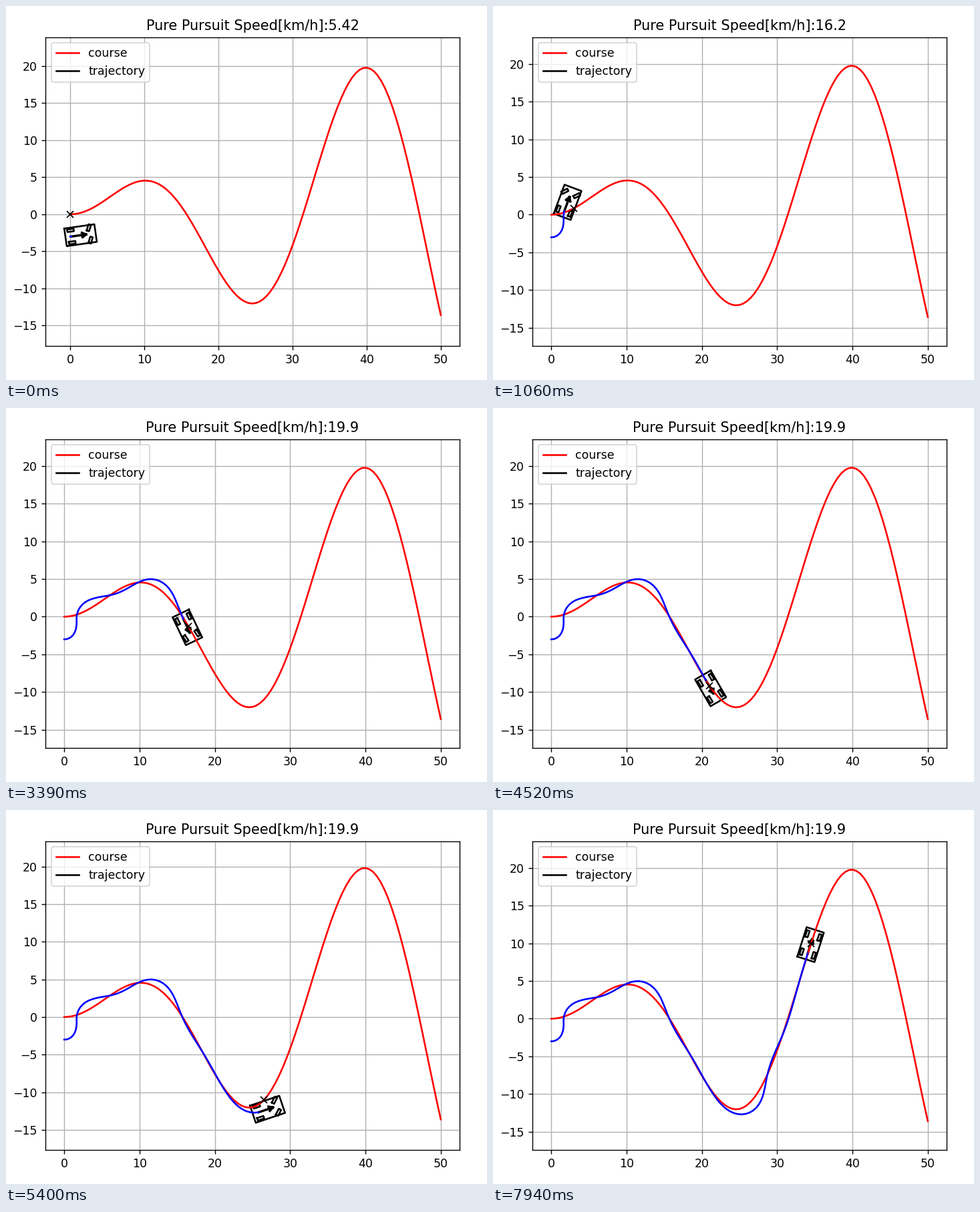
A matplotlib script that plays this animation: 720x560 px, repeating every 8 s.

```python
import math

import matplotlib.pyplot as plt
import numpy as np
from matplotlib.animation import FuncAnimation
from matplotlib.lines import Line2D

WIDTH, HEIGHT, DPI = 720, 560, 125
LOOP_MS, FRAME_MS = 8000, 40

# controller
DT, WHEELBASE, TARGET_SPEED = 0.1, 2.5, 20 / 3.6
LOOK_GAIN, LOOK_MIN = 0.1, 2.0

# drawn car, measured from the rear axle
REAR, FRONT, BODY_W = 0.8, 3.3, 2.4
TRACK, TYRE_R, TYRE_W = 1.68, 0.44, 0.35

# (first change, last change, number of changes, simulation step reached)
PLAYBACK = [
    (130, 930, 11, 15), (1060, 1260, 3, 19), (1410, 1740, 4, 27),
    (1940, 2270, 4, 34), (2530, 2530, 1, 39), (2730, 2800, 2, 44),
    (2940, 3660, 9, 54), (3790, 4520, 9, 68), (4720, 5260, 7, 80),
    (5400, 5600, 3, 84), (5750, 6530, 9, 99), (6810, 7270, 6, 111),
    (7470, 7600, 3, 117), (7870, 7940, 2, 123),
]

course_x = np.arange(0, 50.5, 0.5)
course_y = np.sin(course_x / 5) * course_x / 2


def simulate(steps):
    """Pure pursuit run; rows of x, y, yaw, v, steer, target index."""
    x, y, yaw, v = 0.0, -3.0, 0.0, 0.0
    target = nearest = 0
    rows = [(x, y, yaw, v, 0.0, 0)]
    for _ in range(steps):
        rx = x - WHEELBASE / 2 * math.cos(yaw)
        ry = y - WHEELBASE / 2 * math.sin(yaw)
        dist = np.hypot(course_x - rx, course_y - ry)
        while nearest + 1 < len(dist) and dist[nearest + 1] <= dist[nearest]:
            nearest += 1
        look = LOOK_GAIN * v + LOOK_MIN
        ahead = nearest
        while ahead + 1 < len(dist) and dist[ahead] < look:
            ahead += 1
        target = max(target, ahead)
        alpha = math.atan2(course_y[target] - ry, course_x[target] - rx) - yaw
        steer = math.atan(2 * WHEELBASE * math.sin(alpha) / look)
        x += v * math.cos(yaw) * DT
        y += v * math.sin(yaw) * DT
        yaw += v / WHEELBASE * math.tan(steer) * DT
        v += (TARGET_SPEED - v) * DT
        rows.append((x, y, yaw, v, steer, target))
    return np.array(rows)


def build_schedule(first_step):
    times, steps = [0], [first_step]
    for start, end, count, reached in PLAYBACK:
        times.extend(np.linspace(start, end, count))
        steps.extend(np.linspace(steps[-1], reached, count + 1)[1:])
    return np.array(times), np.rint(steps).astype(int)


def rotate(points, angle):
    c, s = math.cos(angle), math.sin(angle)
    return points @ np.array([[c, s], [-s, c]])


def box(x0, x1, half_width):
    w = half_width
    return np.array([[x0, w], [x0, -w], [x1, -w], [x1, w], [x0, w]])


def join(parts):
    gap = np.full((1, 2), np.nan)
    return np.vstack([p for part in parts for p in (part, gap)])


def car_outline(steer):
    tyre = box(-TYRE_R, TYRE_R, TYRE_W / 2)
    turned = rotate(tyre, steer)
    parts = [box(-REAR, FRONT, BODY_W / 2)]
    for side in (TRACK / 2, -TRACK / 2):
        parts += [tyre + [0, side], turned + [WHEELBASE, side]]
    return join(parts)


def arrow_outline():
    length = 0.8 * WHEELBASE
    head = 0.3 * length
    dx, dy = head * math.cos(math.pi / 6), head * math.sin(math.pi / 6)
    tip = [length, 0]
    return join([np.array([[0, 0], tip]),
                 np.array([tip, [length - dx, dy]]),
                 np.array([tip, [length - dx, -dy]])])


run = simulate(PLAYBACK[-1][3])
change_times, change_steps = build_schedule(3)
arrow_shape = arrow_outline()

fig = plt.figure(figsize=(WIDTH / DPI, HEIGHT / DPI), dpi=DPI, facecolor="white")
ax = fig.add_axes([59 / WIDTH, 51.4 / HEIGHT, 620 / WIDTH, 462 / HEIGHT])
car, = ax.plot([], [], color="black")
arrow, = ax.plot([], [], color="black", linewidth=2)
ax.plot(course_x, course_y, "-r")
trail, = ax.plot([], [], "-b")
goal, = ax.plot([], [], "xk")
ax.axis("equal")
ax.grid(True)
ax.legend([Line2D([], [], color="red"), Line2D([], [], color="black")],
          ["course", "trajectory"], loc="upper left")
title = ax.set_title("")


def draw(frame):
    now = (frame + 1) * FRAME_MS - 1
    step = change_steps[np.searchsorted(change_times, now, side="right") - 1]
    x, y, yaw, v, steer, target = run[step]
    for line, shape in ((car, car_outline(steer)), (arrow, arrow_shape)):
        line.set_data(*(rotate(shape, yaw) + [x, y]).T)
    trail.set_data(run[:step + 1, 0], run[:step + 1, 1])
    goal.set_data([course_x[int(target)]], [course_y[int(target)]])
    title.set_text("Pure Pursuit Speed[km/h]:" + str(v * 3.6)[:4])
    ax.relim()
    ax.autoscale_view()
    return car, arrow, trail, goal, title


anim = FuncAnimation(fig, draw, frames=LOOP_MS // FRAME_MS, interval=FRAME_MS,
                     init_func=lambda: (), repeat=True, repeat_delay=0)
plt.show()
```
